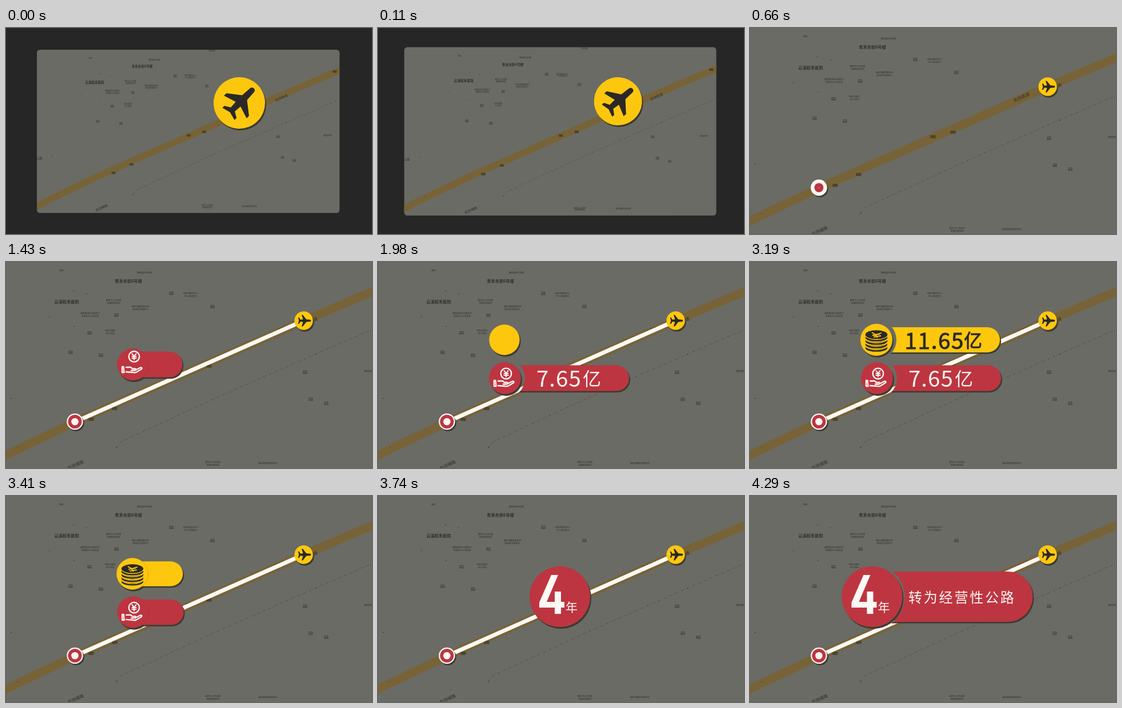
Animation, 640 px wide and 360 px high, one loop 4400 ms. Source, as an HTML page:

```html
<!DOCTYPE html>
<html lang="zh">
<head>
<meta charset="utf-8">
<style>
html, body { margin: 0; width: 100%; height: 100%; overflow: hidden; background: #262626; }
svg { display: block; width: 100vw; height: 100vh; }
text { font-family: "Noto Sans CJK SC", "Noto Sans CJK", "Noto Sans", sans-serif; }
.map text { fill: #302f2a; text-anchor: middle; }
.big { font-size: 38.5px; }
</style>
</head>
<body>
<svg viewBox="0 0 640 360">
  <defs>
    <clipPath id="card"><rect x="-25.2" y="-4.6" width="688" height="371" rx="7"/></clipPath>
    <clipPath id="disc"><circle r="28"/></clipPath>
  </defs>
  <g id="map" class="map" clip-path="url(#card)">
    <rect x="-26" y="-6" width="690" height="374" fill="#6a6b64"/>
    <path d="M-30 354L0 337.500L30 323L120 280L520 103L670 39" fill="none" stroke="#776337" stroke-width="15" stroke-linejoin="round"/>
    <path d="M193 324L201 314L366 238L541 161L662 109" fill="none" stroke="#3a3a34" stroke-width=".8" stroke-dasharray="3 3 1 4"/>
    <g id="labels"></g>
  </g>
  <path id="route" fill="none" stroke="#fcf8f4" stroke-width="7"/>
  <g transform="translate(120.5 279)">
    <circle id="startShadow" cx="2" cy="2.5" fill="#3c3b35"/>
    <circle id="startRim" fill="#fcf8f4"/>
    <circle id="startRed" fill="#bd3540"/>
    <circle id="startDot" fill="#fcf8f4"/>
  </g>
  <g id="plane">
    <circle id="planeShadow" fill="#3c3b35"/>
    <g id="planeBody">
      <circle r="45" fill="#fdc70e"/>
      <path fill="#2a2927" d="M30-5Q36-5 36 0Q36 5 30 5L13 6L-4 28H-10L-3 6L-16 5L-22 15H-27L-23 0L-27-15H-22L-16-5L-3-6L-10-28H-4L13-6Z"/>
    </g>
  </g>
  <g id="badges"></g>
</svg>
<script>
const LOOP = 4400, STEP = 110;
const $ = id => document.getElementById(id);
const set = (id, attrs) => { for (const k in attrs) $(id).setAttribute(k, attrs[k]); };
const mix = (a, b, p) => a + (b - a) * p;
const clamp = p => Math.max(0, Math.min(1, p));
const ease = (t, from, to) => { const p = clamp((t - from) / (to - from)); return p * p * (3 - 2 * p); };

// Map labels
const label = (x, y, size, text, extra = '') =>
  `<text transform="translate(${x} ${y}) ${extra}" y="${size * 0.36}" font-size="${size}">${text}</text>`;
const words = '停车场便民超市综合服务中心活动室卫生站快餐店';
const tinyBlocks = [
  [97, 15, 2, 1], [242, 19, 7, 1], [323, 57, 7, 2], [188, 69, 7, 2], [235, 80, 8, 2], [147, 92, 9, 2],
  [182, 122, 5, 2], [362, 352, 7, 2], [458, 352, 9, 1], [636, 191, 5, 1], [372, -2, 4, 1]
];
const buildings = [[289, 55], [361, 78], [193, 93], [146, 124], [113, 158], [166, 163], [523, 193], [533, 240], [560, 247]];
const shields = [[149, 275], [190, 256], [320, 190], [355, 182], [652, 45]];
const specks = [[118, 50], [141, 55], [76, 95], [119, 112], [9, 238], [21, 324], [193, 324], [541, 161]];
$('labels').innerHTML = [
  `<g font-weight="700">${label(214, 33.5, 7.2, '青禾东街6号楼')}${label(106, 69, 7.2, '云溪松禾医院')}</g>`,
  label(475, 121, 7.4, '机场高速', 'rotate(-24)'),
  label(531, 104.5, 7.4, '机场高速', 'rotate(-24)'),
  label(122, 354.5, 7.4, '机场辅路', 'rotate(-24)'),
  label(-19, 242, 6, '山路'),
  ...tinyBlocks.flatMap(([x, y, n, rows], i) => Array.from({ length: rows }, (_, r) => {
    const at = (i * 3 + r * 5) % 12;
    return label(x, y + (r - (rows - 1) / 2) * 5, 3.8, words.slice(at, at + n - r));
  })),
  ...buildings.map(([x, y]) =>
    `<path transform="translate(${x} ${y})" d="M-3 3V-2.500H3V3M-1.500 0H1.500V2H-1.500Z" fill="none" stroke="#302f2a" stroke-width=".7"/>`),
  ...shields.map(([x, y]) =>
    `<path transform="translate(${x} ${y})" d="M-4-2H4V2H-4ZM-1.300-2V2M1.300-2V2M-4 0H4" fill="none" stroke="#3f3826" stroke-width="1.1"/>`),
  ...specks.map(([x, y]) => `<rect x="${x - 1}" y="${y}" width="2" height="1" fill="#393832"/>`)
].join('');

// A disc with a pill that slides out from behind it
function badge(id, { r, half, right, color, pillContent, discContent }) {
  const pill = (dx, dy, fill) =>
    `<rect x="${dx - half}" y="${dy - half}" width="${right + half}" height="${2 * half}" rx="${half}" fill="${fill}"/>`;
  return `<mask id="${id}Mask" maskUnits="userSpaceOnUse" x="0" y="-70" width="340" height="140">
      <rect y="-70" width="340" height="140" fill="#fff"/><circle id="${id}Hole" fill="#000"/>
    </mask>
    <g id="${id}">
      <circle cx="2" cy="3" r="${r}" fill="#3c3b35"/>
      <g mask="url(#${id}Mask)"><g id="${id}Pill">
        ${pill(2, 2.5, '#3c3b35')}${pill(0, 0, color)}
        <g id="${id}Text">${pillContent}</g>
      </g></g>
      <circle r="${r}" fill="${color}"/>
      ${discContent}
    </g>`;
}

const coin = (_, i) => `<g id="coin${i}">
    <path d="M-20 0V5C-20 15 20 15 20 5V0Z" fill="#2a2927" stroke="#fdc70e" stroke-width="1.5"/>
    <ellipse rx="20" ry="8.5" fill="#2a2927" stroke="#fdc70e" stroke-width="1.3"/>
    <path d="M-8-4L-1 0L9-3M-1 0L2 5M-7 1L6-1M-5 4L8 2" fill="none" stroke="#fdc70e" stroke-width="1.8"/>
  </g>`;

const specs = {
  cost: {
    r: 28, gap: 35, half: 22.5, right: 217, color: '#bd3540',
    pillContent: `<g fill="#fcf8f4" font-weight="300">
        <text class="big" x="55" y="14.5" letter-spacing="1">7.65</text><text x="136" y="12.5" font-size="32">亿</text>
      </g>`,
    discContent: `<g fill="none" stroke="#fcf8f4" stroke-width="2.3" stroke-linejoin="round" stroke-linecap="round">
        <path d="M-19 4H-16.500L-15.500 14H-19ZM-12 5H-7Q-4 4-1 7.500H4Q6.500 9 3.500 10.500H-3M6 9L13 5.500Q17 5 15 8L6 13.500Q3 15 0 14L-12 13"/>
        <g id="costCoin"><circle r="9.3"/><path stroke-width="2" d="M-3.500-5L0-.500L3.500-5M0-.500V5.500M-3.500 0H3.500M-3.500 3H3.500"/></g>
      </g>`
  },
  income: {
    r: 28, gap: 35, half: 22, right: 216, color: '#fdc70e',
    pillContent: `<g fill="#2a2927" stroke="#2a2927" stroke-width=".9">
        <text class="big" x="49.5" y="15.5" letter-spacing="1.7">11.65</text><text x="153" y="13" font-size="32">亿</text>
      </g>`,
    discContent: `<g clip-path="url(#disc)">${Array.from({ length: 4 }, coin).join('')}</g>`
  },
  years: {
    r: 53, gap: 57, half: 44, right: 281, color: '#bd3540',
    pillContent: `<text x="63.5" y="9.5" font-size="24" letter-spacing="2.8" fill="#fcf8f4">转为经营性公路</text>`,
    discContent: `<path role="img" aria-label="4" d="M-15-38H-3L-23 9H-9V-9H2V9H8V19H2V30H-9V19H-36V10Z" fill="#fcf8f4"/>
      <text x="10" y="26" font-size="21" fill="#fcf8f4">年</text>`
  }
};
$('badges').innerHTML = Object.entries(specs).map(([id, spec]) => badge(id, spec)).join('');

function pose(id, x, y, scale, slide) {
  const { r, gap, right } = specs[id];
  set(id, { transform: `translate(${x} ${y}) scale(${scale})`, visibility: scale > 0 ? 'visible' : 'hidden' });
  set(id + 'Pill', { transform: `translate(${mix(r - right - 3, 0, slide)} 0)` });
  set(id + 'Text', { opacity: ease(slide, 0.35, 0.6) });
  set(id + 'Hole', { r: mix(r, gap, ease(slide, 0.35, 0.75)) });
}

function draw(t) {
  const zoom = ease(t, 0, 550);
  set('map', { transform: `translate(${mix(73.4, 0, zoom)} ${mix(41.5, 0, zoom)}) scale(${mix(1 / 1.3, 1, zoom)})` });

  const size = mix(45, 16.2, zoom);
  set('plane', { transform: `translate(${mix(408, 520.5, zoom)} ${mix(131, 102.5, zoom)})` });
  set('planeShadow', { cx: 2, cy: 3, r: size });
  set('planeBody', { transform: `scale(${size / 45}) rotate(${mix(-45, 0, zoom)})` });

  const rim = 14.3 * ease(t, 480, 650);
  set('startShadow', { r: rim });
  set('startRim', { r: rim });
  set('startRed', { r: 12 * ease(t, 550, 730) });
  set('startDot', { r: 6.3 * ease(t, 620, 830) });

  const drawn = ease(t, 770, 1210);
  set('route', {
    d: `M120.5 279.5L${mix(120.5, 520.5, drawn)} ${mix(279.5, 102.5, drawn)}`,
    visibility: drawn > 0 ? 'visible' : 'hidden'
  });

  const leave = 1 - ease(t, 3400, 3570), retract = 1 - ease(t, 3300, 3480);
  pose('cost', 222, mix(179, 203, ease(t, 1760, 1980)), ease(t, 1100, 1270) * leave, ease(t, 1264, 1704) * retract);
  set('costCoin', { transform: `translate(2 ${mix(-18, -8, ease(t, 1330, 1550))})` });

  pose('income', 221, 136, ease(t, 1850, 2000) * leave, ease(t, 2006, 2446) * retract);
  for (let i = 0; i < 4; i++) {
    const fall = clamp((t - 2173 - i * 64) / 200);
    set('coin' + i, { transform: `translate(0 ${mix(-42, 9 - i * 6, fall * fall)})` });
  }

  pose('years', mix(318, 213.5, ease(t, 3800, 4070)), 176, ease(t, 3520, 3700), ease(t, 3880, 4240));
}

function tick(now) {
  draw(Math.floor((now % LOOP) / STEP) * STEP);
  requestAnimationFrame(tick);
}
draw(0);
requestAnimationFrame(tick);
</script>
</body>
</html>
```
